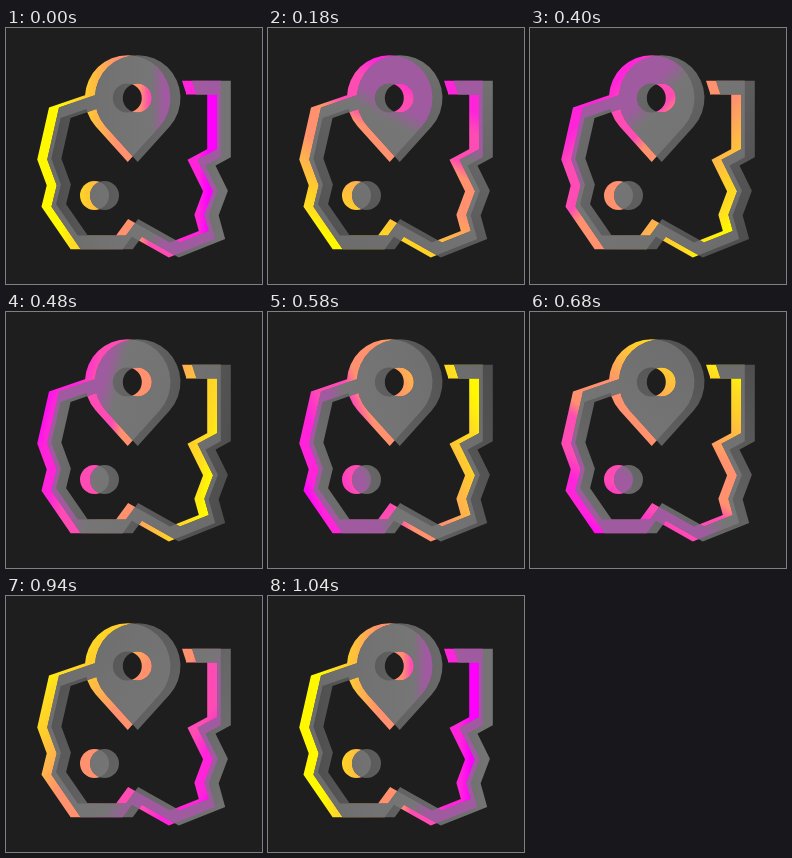
Write an HTML page that moves like this. It is 256x256 px and loops after 1060 ms.

```html
<!DOCTYPE html>
<html lang="en">
<head>
<meta charset="utf-8">
<title>Route pin</title>
<style>
html, body { margin: 0; width: 100%; height: 100%; overflow: hidden; background: #1e1e1e; }
svg { display: block; width: 100vw; height: 100vh; }
</style>
</head>
<body>
<svg viewBox="0 0 256 256">
  <defs>
    <g id="icon" fill="#fff">
      <path fill="none" stroke="#fff" stroke-width="13.6" stroke-miterlimit="8"
        d="M180 59.6H208V125.2L190.5 134.7 204.5 163 195.5 187 201 207 163.3 222 124 199.8 113.3 214.4H68.2L42.8 177.5 47.8 157 38.3 131 48.8 84.8 81 73.6"/>
      <path d="M176 52.8h4.5v13.6z"/>
      <path fill-rule="evenodd"
        d="M121.7 134L89.7 98.4A42.8 42.8 0 1 1 153.7 98.4ZM106.8 70a14.5 14.5 0 1 0 29 0a14.5 14.5 0 1 0 -29 0Z"/>
      <circle cx="88.5" cy="167.5" r="14.5"/>
    </g>
    <mask id="back" maskUnits="userSpaceOnUse" x="0" y="0" width="256" height="256"><use href="#icon"/></mask>
    <mask id="front" maskUnits="userSpaceOnUse" x="0" y="0" width="256" height="256"><use href="#icon" x="10"/></mask>

    <linearGradient id="glow" gradientUnits="userSpaceOnUse">
      <stop offset=".12" stop-color="#fff800"/>
      <stop offset=".18" stop-color="#ffdc22"/>
      <stop offset=".24" stop-color="#ffd028"/>
      <stop offset=".33" stop-color="#ffb44b"/>
      <stop offset=".42" stop-color="#ff916e"/>
      <stop offset=".55" stop-color="#ff916e"/>
      <stop offset=".6" stop-color="#ff4bb4"/>
      <stop offset=".72" stop-color="#ff4bb4"/>
      <stop offset=".79" stop-color="#ff24da"/>
      <stop offset=".87" stop-color="#ff24da"/>
      <stop offset=".92" stop-color="#f0f"/>
    </linearGradient>
    <linearGradient id="shade" gradientUnits="userSpaceOnUse">
      <stop offset="0" stop-color="#4c4c4c"/>
      <stop offset="1" stop-color="#747474"/>
    </linearGradient>
    <linearGradient id="blend" gradientUnits="userSpaceOnUse">
      <stop offset="0" stop-color="#6a6a6a"/>
      <stop offset=".35" stop-color="#727272"/>
      <stop offset=".61" stop-color="#767676"/>
      <stop offset=".68" stop-color="#a05aa0"/>
    </linearGradient>
  </defs>
  <rect width="256" height="256" fill="#1e1e1e"/>
  <rect width="256" height="256" fill="url(#glow)" mask="url(#back)"/>
  <rect width="256" height="256" fill="url(#shade)" mask="url(#front)"/>
  <g mask="url(#front)">
    <rect width="256" height="256" fill="url(#blend)" mask="url(#back)"/>
  </g>
</svg>
<script>
const LOOP = 1060, STEP = 20, TURN = 1040;
const CX = 125, CY = 128, HALF_W = 92, HALF_H = 101;
const gradients = document.querySelectorAll("linearGradient");

// The light makes one counter-clockwise turn, then holds for one step.
function draw() {
  const time = Math.floor(performance.now() % LOOP / STEP) * STEP;
  const angle = 2 * Math.PI * time / TURN;
  const c = Math.cos(angle), s = -Math.sin(angle);
  // The gradient line reaches far enough to cover the corners of the box.
  const reach = HALF_W * Math.abs(c) + HALF_H * Math.abs(s);
  const line = { x1: CX - reach * c, y1: CY - reach * s, x2: CX + reach * c, y2: CY + reach * s };
  for (const g of gradients)
    for (const key in line) g.setAttribute(key, line[key]);
  requestAnimationFrame(draw);
}
draw();
</script>
</body>
</html>
```
